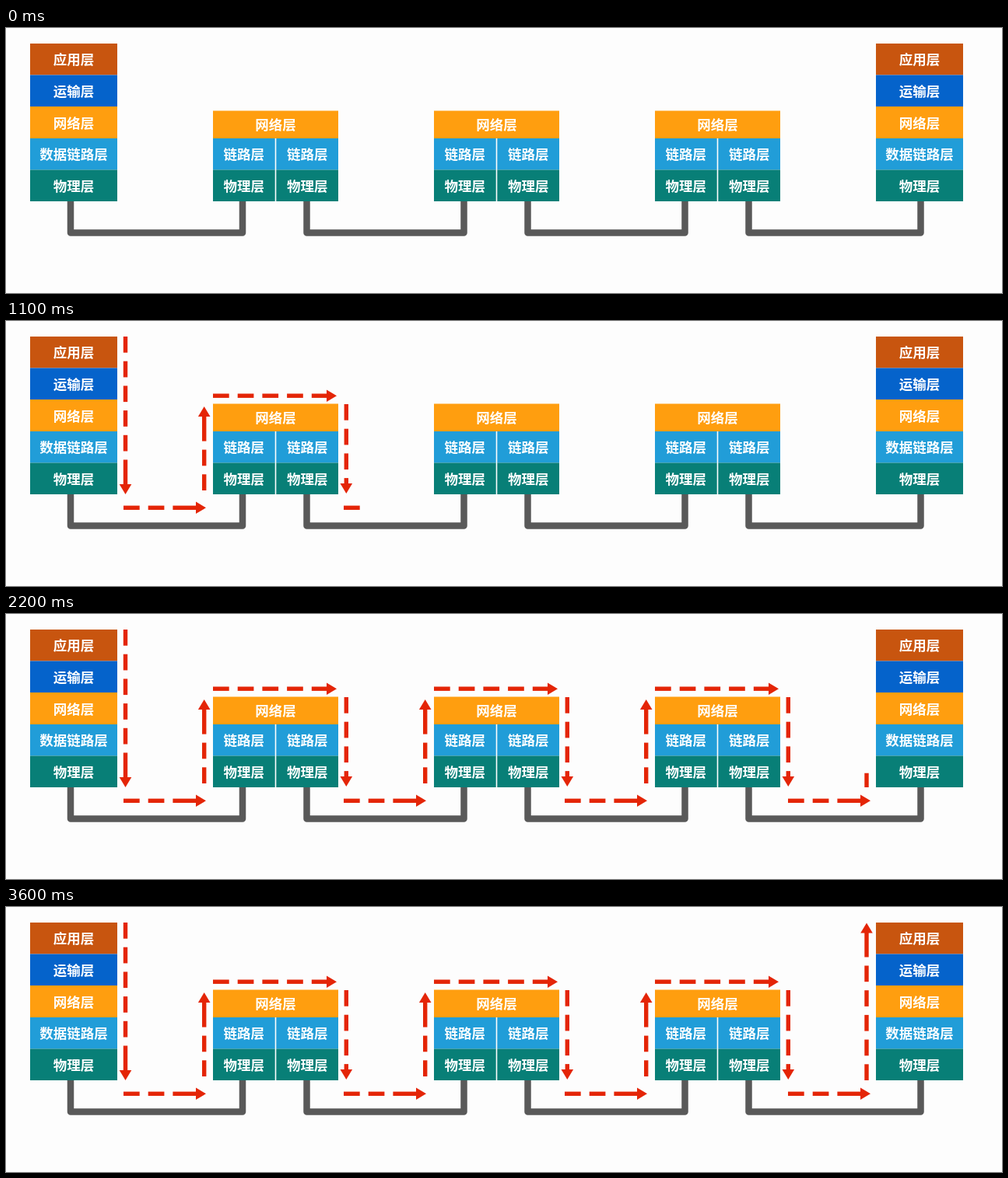
Recreate the animation shown at these times as an HTML page. Size 1280 by 341 pixels, loop 3700 ms.

```html
<!DOCTYPE html>
<html lang="zh-CN">
<head>
<meta charset="utf-8">
<title>网络分层</title>
<style>
  html, body { margin: 0; width: 100%; height: 100%; overflow: hidden; background: #fdfdfd; }
  svg { display: block; width: 1280px; height: 341px; }
  text { font: 700 17.5px "Noto Sans CJK SC", "Noto Sans CJK", sans-serif; fill: #fff; text-anchor: middle; }
</style>
</head>
<body>
<svg id="stage" viewBox="0 0 1280 341"></svg>
<script>
const LOOP = 3700, STEP = 100;
const stage = document.getElementById('stage');

function add(parent, tag, attrs, text) {
  const el = document.createElementNS('http://www.w3.org/2000/svg', tag);
  for (const k in attrs) el.setAttribute(k, attrs[k]);
  if (text) el.textContent = text;
  parent.appendChild(el);
  return el;
}

function box(x, y, w, h, fill, label) {
  add(stage, 'rect', { x, y, width: w, height: h, fill });
  add(stage, 'text', { x: x + w / 2, y: y + h / 2 + 7 }, label);
}

const ORANGE = '#ff9e0f', BLUE = '#219dd8', TEAL = '#087f77';
const LAYERS = [
  ['应用层', '#c8550f'], ['运输层', '#0563cb'], ['网络层', ORANGE],
  ['数据链路层', BLUE], ['物理层', TEAL]
];
const ROWS = [20, 60.5, 101, 142, 182.5, 223];
const ROUTERS = [266, 550, 834];

function host(x) {
  LAYERS.forEach(([label, fill], i) => box(x, ROWS[i], 112, ROWS[i + 1] - ROWS[i], fill, label));
}

function router(x) {
  box(x, 106.5, 161, 35.5, ORANGE, '网络层');
  for (const dx of [0, 81.3]) {
    box(x + dx, 142, 79.7, 40.5, BLUE, '链路层');
    box(x + dx, 182.5, 79.7, 40.5, TEAL, '物理层');
  }
}

function wire(x1, x2) {
  add(stage, 'path', {
    d: `M${x1} 222V263.5H${x2}V222`,
    fill: 'none', stroke: '#595959', 'stroke-width': 8.5, 'stroke-linejoin': 'round'
  });
}

[[83, 304], [386.5, 588.5], [670.5, 872.5], [954.5, 1175.5]].forEach(w => wire(...w));
host(31);
ROUTERS.forEach(router);
host(1118);

// A dashed arrow, uncovered from tail to tip by a clip of growing width.
const arrows = [];
function arrow(x, y, angle, length) {
  const id = 'wipe' + arrows.length, neck = length - 13;
  const clip = add(add(stage, 'clipPath', { id }), 'rect', { x: 0, y: -10, width: 0, height: 20 });
  const g = add(stage, 'g', {
    transform: `translate(${x} ${y}) rotate(${angle})`, 'clip-path': `url(#${id})`, fill: '#e42507'
  });
  const gap = 31.7;
  for (let s = 0; s < neck; s += gap) {
    const end = s + gap < neck ? s + 20.7 : neck + 1;
    add(g, 'rect', { x: s, y: -2.7, width: end - s, height: 5.4 });
  }
  add(g, 'path', { d: `M${neck} -7.8L${length} 0L${neck} 7.8Z` });
  arrows.push({ clip, length });
}

const RIGHT = 0, DOWN = 90, UP = -90;
arrow(153.5, 20, DOWN, 203);
arrow(151, 240.3, RIGHT, 106);
ROUTERS.forEach((x, i) => {
  arrow(x - 11.3, 218, UP, 108);
  arrow(x, 96.2, RIGHT, 159);
  arrow(x + 171.3, 107, DOWN, 115);
  arrow([434, 718, 1005][i], 240.3, RIGHT, 106);
});
arrow(1106, 223, UP, 202.5);

// [time in ms, number of arrows drawn]
const PACE = [[400, 0], [615, 1], [700, 1.73], [1100, 5.2], [1800, 10.9], [2200, 14.09], [2400, 15]];

function drawn(t) {
  if (t <= PACE[0][0]) return 0;
  for (let i = 1; i < PACE.length; i++) {
    const [t0, n0] = PACE[i - 1], [t1, n1] = PACE[i];
    if (t <= t1) return n0 + (n1 - n0) * (t - t0) / (t1 - t0);
  }
  return arrows.length;
}

function render(t) {
  const n = drawn(Math.floor(t / STEP) * STEP);
  arrows.forEach(({ clip, length }, i) => {
    const part = Math.max(0, Math.min(1, n - i));
    clip.setAttribute('width', part * (length + 1));
  });
}

const start = performance.now();
function tick() {
  render((performance.now() - start) % LOOP);
  requestAnimationFrame(tick);
}
tick();
</script>
</body>
</html>
```
